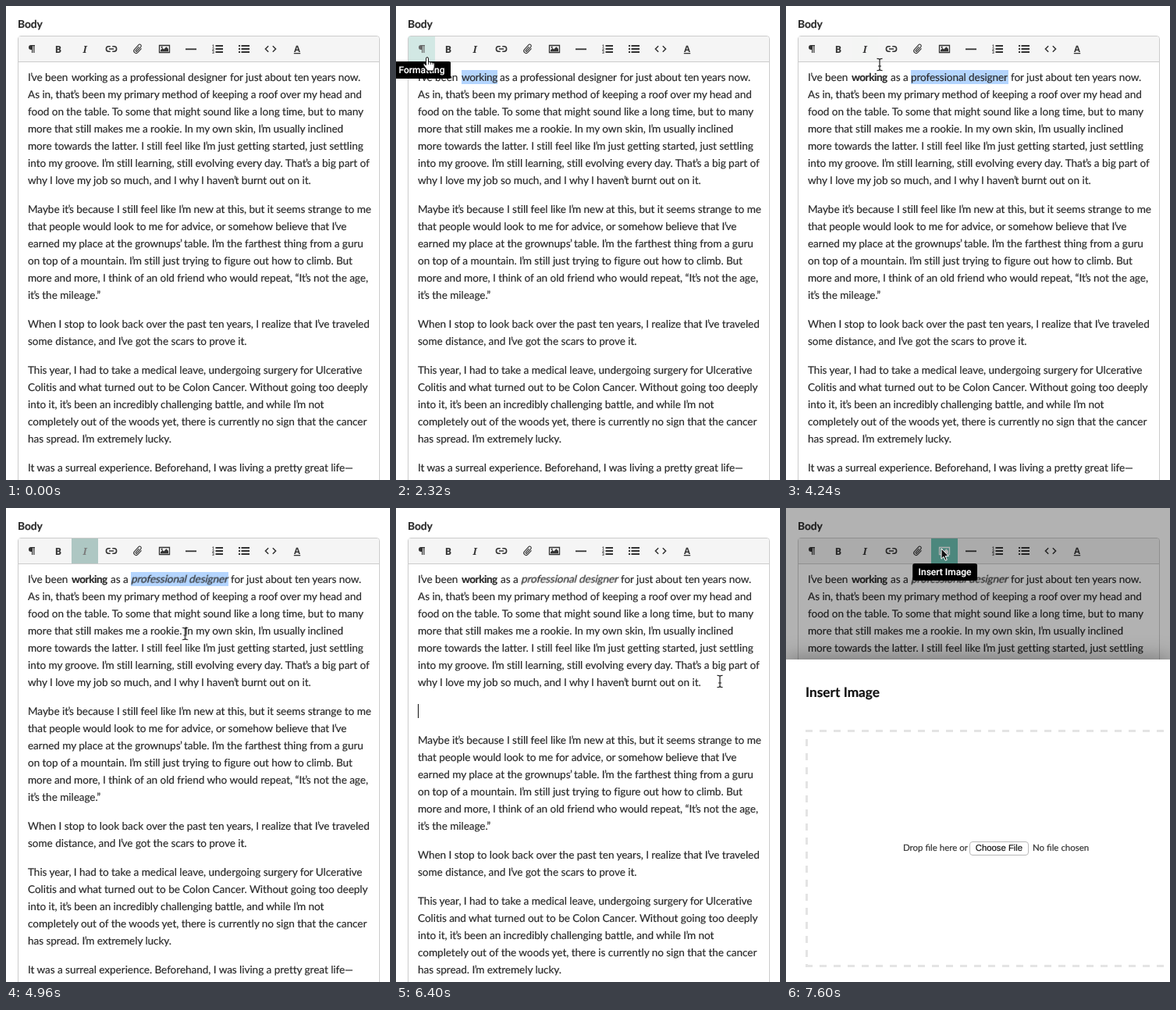
Animation, 492 px wide and 607 px high, one loop 8 s. Source, as an HTML page:

```html
<!DOCTYPE html>
<html lang="en">
<head>
<meta charset="utf-8">
<title>Text editor</title>
<style>
/* The loop is 8 s, so 1% of every keyframe rule is one 80 ms tick. */
html, body { margin: 0; width: 100%; height: 100%; overflow: hidden; background: #fff; }
#stage {
  position: relative; width: 492px; height: 607px; overflow: hidden; background: #fff;
  font: 13.6px/22px Lato, sans-serif; letter-spacing: -.06px; color: #2a2a2a;
  text-rendering: geometricPrecision; white-space: nowrap;
  -webkit-text-stroke: .18px;
}
#stage div, #stage span, #cursor { position: absolute; }
#stage i { font-style: normal; margin-left: -.5px; letter-spacing: -1.4px; }
#label { left: 15px; top: 12px; font-weight: 700; font-size: 13.8px; }
#frame {
  left: 15px; top: 38px; width: 462px; height: 600px;
  border: 1px solid #ccc; border-radius: 4px 4px 0 0;
}
#bar {
  --off: #f5f5f5; --hot: #6cc1b3; --on: #c9c9c9;
  left: 0; top: 0; width: 462px; height: 32px; display: flex;
  background: var(--off); border-bottom: 1px solid #ccc; border-radius: 3px 3px 0 0;
}
#bar svg {
  width: 34px; height: 32px; color: #333; fill: currentColor; -webkit-text-stroke: 0;
  font: 700 12.5px "Noto Sans", sans-serif; text-anchor: middle;
}
#bar .line { fill: none; stroke: currentColor; stroke-width: 1.6; }
#line1 span { top: 80px; }
#rest { left: 28px; top: 102px; }
#rest p { margin: 0 0 15px; }
#later { top: 147px; left: 0; }
.sel { top: 82px; height: 18px; background: #b4d5fe; }
.caret { width: 1px; background: #111; }
.tip {
  top: 71px; height: 22px; padding: 0 8px; border-radius: 3px; translate: -50%;
  background: #000; color: #fff; font: 500 12px/22px Roboto, sans-serif; letter-spacing: 0;
}
#shade { inset: 0; background: rgba(0, 0, 0, .3); }
#modal {
  left: 0; top: 194px; width: 492px; height: 413px; background: #fff;
  box-shadow: 0 0 26px rgba(0, 0, 0, .4); font-size: 11.5px; letter-spacing: 0; color: #333;
}
#modal b { position: absolute; left: 25px; top: 31px; font-size: 17.3px; color: #111; }
.dash { --d: #e4e4e4 0 9px, transparent 9px 18px; left: 25px; }
.dash.h { width: 467px; height: 3px; background: repeating-linear-gradient(90deg, var(--d)); }
.dash.v { top: 102px; width: 3px; height: 292px; background: repeating-linear-gradient(var(--d)); }
#pick {
  left: 235px; top: 233px; width: 74px; height: 16px; border: 1px solid #b8b8b8; border-radius: 4px;
  font: 11.3px/16px "Liberation Sans", sans-serif; text-align: center; color: #111;
}
#cursor { left: 0; top: 0; overflow: visible; width: 1px; height: 1px; }

/* Hard switches */
#work, #ital, #tail, #as, #later, .sel, .caret, .tip, #shade, #modal, #cursor, .shape {
  animation: 8s step-end infinite;
}
#work { left: 84px; letter-spacing: -.3px; animation-name: bold; }
#ital { left: 159px; letter-spacing: -.1px; transform-origin: 0 16px; animation-name: italic; }
#as { left: 133px; animation-name: nudge; }
#tail { left: 287px; letter-spacing: -.1px; animation-name: nudge; }
#later { animation-name: enter; }
#selA { left: 84px; width: 46px; animation-name: selA; }
#selB { left: 160px; width: 125px; animation-name: selB; }
#caretA { left: 390px; top: 210px; height: 22px; animation-name: caretA; }
#caretB { left: 28px; top: 251px; height: 18px; animation-name: caretB; }
#tipF { left: 33px; animation-name: tipF; }
#tipB { left: 67px; animation-name: tipB; }
#tipI { left: 101px; animation-name: tipI; }
#tipP { left: 203.5px; animation-name: tipP; }
#shade, #modal { animation-name: modal; }
#cursor { animation-name: path; }
#beam { animation-name: beam; }
#hand { animation-name: hand; }
#arrow { animation-name: modal; }

@keyframes bold { 0% { font-weight: 400 } 34%, 100% { font-weight: 700; letter-spacing: -.5px } }
@keyframes italic { 0% { translate: 0 } 34% { translate: 1px } 60%, 100% { translate: 1px; transform: skewX(-13deg) } }
@keyframes nudge { 0% { translate: 0 } 34%, 100% { translate: 1px } }
@keyframes enter { 0% { translate: 0 } 80%, 100% { translate: 0 37px } }
@keyframes selA { 0%, 45%, 100% { opacity: 0 } 26% { opacity: 1; width: 46px } 34% { opacity: 1; width: 47px } }
@keyframes selB { 0%, 72%, 100% { opacity: 0 } 45% { opacity: 1; width: 73px } 46% { opacity: 1; width: 125px } }
@keyframes caretA { 0%, 78%, 100% { opacity: 0 } 72% { opacity: 1 } }
@keyframes caretB { 0%, 87% { opacity: 0 } 80%, 92%, 100% { opacity: 1 } }
@keyframes tipF { 0%, 13%, 31%, 100% { opacity: 0 } 11%, 29% { opacity: 1 } }
@keyframes tipB { 0%, 17%, 38%, 100% { opacity: 0 } 13%, 31% { opacity: 1 } }
@keyframes tipI { 0%, 61%, 100% { opacity: 0 } 54% { opacity: 1 } }
@keyframes tipP { 0% { opacity: 0 } 88%, 100% { opacity: 1 } }
@keyframes modal { 0% { opacity: 0 } 95%, 100% { opacity: 1 } }
@keyframes hand { 0%, 17%, 38%, 61%, 95%, 100% { opacity: 0 } 11%, 29%, 54%, 88% { opacity: 1 } }
@keyframes beam { 0%, 11%, 29%, 54%, 88%, 100% { opacity: 0 } 1%, 17%, 38%, 61% { opacity: 1 } }

/* Pointer: up to the bar, both words, end of paragraph, image button */
@keyframes path {
  0%, 1% { translate: 314px 574px }
  2% { translate: 240px 455px }
  3% { translate: 175px 345px }
  4% { translate: 157px 321px }
  7% { translate: 150px 302px }
  8% { translate: 122px 220px }
  9% { translate: 80px 120px }
  10% { translate: 50px 80px }
  11% { translate: 38px 62px }
  13% { translate: 53px 60px }
  14% { translate: 62px 60px }
  15% { translate: 67px 58px }
  17% { translate: 92px 80px }
  18% { translate: 112px 87px }
  20% { translate: 105px 88px }
  22% { translate: 103px 90px }
  24% { translate: 102px 91px }
  27% { translate: 92px 86px }
  28% { translate: 62px 75px }
  29% { translate: 40px 66px }
  30% { translate: 43px 62px }
  31% { translate: 57px 60px }
  32% { translate: 64px 58px }
  37% { translate: 73px 60px }
  38% { translate: 104px 76px }
  39% { translate: 145px 81px }
  40% { translate: 180px 83px }
  41% { translate: 195px 83px }
  43% { translate: 186px 91px }
  46% { translate: 218px 91px }
  47% { translate: 243px 89px }
  50% { translate: 232px 87px }
  51% { translate: 205px 83px }
  52% { translate: 162px 79px }
  53% { translate: 120px 75px }
  54% { translate: 104px 62px }
  56% { translate: 99px 58px }
  61% { translate: 142px 92px }
  62% { translate: 229.5px 161px }
  63% { translate: 345px 222px }
  64% { translate: 409px 251px }
  66% { translate: 410px 260px }
  69% { translate: 412px 244px }
  71% { translate: 413px 226px }
  73% { translate: 415px 222px }
  83% { translate: 412px 214px }
  84% { translate: 394px 190px }
  85% { translate: 340px 142px }
  86% { translate: 275px 100px }
  87% { translate: 228px 79px }
  88% { translate: 207px 60px }
  90%, 100% { translate: 199px 52px }
}

/* Button fades */
#bF { animation: fadeF 8s linear infinite; }
#bB { animation: fadeB 8s linear infinite; }
#bI { animation: fadeI 8s linear infinite; }
#bP { animation: fadeP 8s linear infinite; }
@keyframes fadeF {
  0%, 9.8%, 14.6%, 28.6%, 32.4%, 100% { background: var(--off); color: #333 }
  11%, 13%, 30.2%, 30.8% { background: var(--hot); color: #fff }
}
@keyframes fadeB {
  0%, 12.5%, 20%, 30.8%, 47%, 100% { background: var(--off); color: #333 }
  14%, 17%, 32%, 37.6% { background: var(--hot); color: #fff }
  40%, 45% { background: var(--on); color: #444 }
}
@keyframes fadeI {
  0%, 53%, 75%, 100% { background: var(--off); color: #333 }
  54.5%, 60.6% { background: var(--hot); color: #fff }
  62.6%, 72% { background: var(--on); color: #444 }
}
@keyframes fadeP {
  0%, 87.4% { background: var(--off); color: #333 }
  89%, 100% { background: var(--hot); color: #fff }
}
</style>
</head>
<body>
<div id="stage">
  <div id="label">Body</div>
  <div id="frame">
    <div id="bar">
      <svg id="bF" viewBox="-17 -16 34 32"><path d="M4-5H-1a3 3 0 0 0 0 6H0V5H1.2V-3.8H2.3V5H3.5V-3.8H4z"/></svg>
      <svg id="bB" viewBox="-17 -16 34 32"><text y="4.5">B</text></svg>
      <svg id="bI" viewBox="-17 -16 34 32"><text y="4.5" font-style="italic" font-family="Noto Serif, serif">I</text></svg>
      <svg viewBox="-17 -16 34 32"><path class="line" d="M-1.3-3.2H-3.4a3.2 3.2 0 0 0 0 6.4H-1.3M1.3-3.2H3.4a3.2 3.2 0 0 1 0 6.4H1.3M-3 0H3"/></svg>
      <svg viewBox="-17 -16 34 32"><path class="line" style="stroke-width:1.1" transform="rotate(42)" d="M2.9-3.5V3.4a2.9 2.9 0 0 1-5.8 0V-4.4a2 2 0 0 1 4 0V3a.9.9 0 0 1-1.9 0V-3"/></svg>
      <svg id="bP" viewBox="-17 -16 34 32"><path class="line" style="stroke-width:1.3" d="M-6.5-4.5h13v9h-13z"/><path d="M-5 3.2V1.5l2.5-2.7L-.8.5 2.4-2.7 5 0v3.2z"/><circle cx="-3.3" cy="-2.2" r="1.1"/></svg>
      <svg viewBox="-17 -16 34 32"><path d="M-7-.6H7V1.2H-7z"/></svg>
      <svg viewBox="-17 -16 34 32"><path d="M-2.5-5H7v2h-9.5zM-2.5-1H7v2h-9.5zM-2.5 3H7v2h-9.5z"/><g font-size="5"><text x="-5.6" y="-2">1</text><text x="-5.6" y="2">2</text><text x="-5.6" y="6">3</text></g></svg>
      <svg viewBox="-17 -16 34 32"><path d="M-3.5-5H7v2H-3.5zM-3.5-1H7v2H-3.5zM-3.5 3H7v2H-3.5zM-7-5h2v2h-2zM-7-1h2v2h-2zM-7 3h2v2h-2z"/></svg>
      <svg viewBox="-17 -16 34 32"><path class="line" style="stroke-width:1.5" d="M-2.8-3.8-6.6 0-2.8 3.8M2.8-3.8 6.6 0 2.8 3.8"/></svg>
      <svg viewBox="-17 -16 34 32"><text y="3.6" font-size="11.5">A</text><path d="M-4.2 5h8.4v1.3h-8.4z"/></svg>
    </div>
  </div>

  <div class="sel" id="selA"></div>
  <div class="sel" id="selB"></div>
  <div id="line1">
    <span style="left:28px">I’ve been</span>
    <span id="work">working</span>
    <span id="as">as a</span>
    <span id="ital">professional designer</span>
    <span id="tail">for just about ten years now.</span>
  </div>
  <div id="rest">
    <p>As in, that’s been my primary method of keeping a roof over my head and<br>
    food on the table. To some that might sound like a long time, but to many<br>
    more that still makes me a rookie. In my own skin, I’m usually inclined<br>
    more towards the latter. I still feel like I’m just getting started, just settling<br>
    into my groove. I’m still learning, still evolving every day. That’s a big part of<br>
    why I love my job so much, and I why I haven’t burnt out on it.</p>
    <div id="later">
      <p>Maybe it’s because I still feel like I’m new at this, but it seems strange to me<br>
      that people would look to me for advice, or somehow believe that I’ve<br>
      earned my place at the grownups’ table. I’m the farthest thing from a guru<br>
      on top of a mountain. I’m still just trying to figure out how to climb. But<br>
      more and more, I think of an old friend who would repeat, “It’s not the age,<br>
      it’s the mileage.”</p>
      <p>When I stop to look back over the past ten years, I realize that I’ve traveled<br>
      some distance, and I’ve got the scars to prove it.</p>
      <p>This year, I had to take a medical leave, undergoing surgery for Ulcerative<br>
      Colitis and what turned out to be Colon Cancer. Without going too deeply<br>
      into it, it’s been an incredibly challenging battle, and while I’m not<br>
      completely out of the woods yet, there is currently no sign that the cancer<br>
      has spread. I’m extremely lucky.</p>
      <p>It was a surreal experience. Beforehand, I was living a pretty great life—</p>
    </div>
  </div>
  <div class="caret" id="caretA"></div>
  <div class="caret" id="caretB"></div>

  <div id="shade"></div>
  <div id="modal">
    <b>Insert Image</b>
    <div class="dash h" style="top:90px"></div>
    <div class="dash v"></div>
    <div class="dash h" style="top:391px"></div>
    <span style="left:150px;top:231px">Drop file here or</span>
    <div id="pick">Choose File</div>
    <span style="left:316px;top:231px">No file chosen</span>
  </div>

  <div class="tip" id="tipF">Formatting</div>
  <div class="tip" id="tipB">Bold</div>
  <div class="tip" id="tipI">Italic</div>
  <div class="tip" id="tipP">Insert Image</div>

  <svg id="cursor">
    <g class="shape" id="beam" fill="none" stroke="#222" stroke-width="1.2">
      <path d="M-3.5-7.6C-1.5-7.6 0-7.2 0-6 0-7.2 1.5-7.6 3.5-7.6M0-6V6M-3.5 7.6C-1.5 7.6 0 7.2 0 6 0 7.2 1.5 7.6 3.5 7.6M-2 2H2"/>
    </g>
    <g class="shape" id="hand" fill="#fff" stroke="#111" stroke-linejoin="round">
      <path d="M-1.5 1.2a1.5 1.5 0 0 1 3 0V6.5c.3-1.4 2.6-1.4 2.8.1.4-1 2.5-.9 2.7.5.5-.8 2.2-.5 2.2 1V12c0 1.5-1 2.5-1.3 5H0C-.5 15-3.5 12-4.8 9.5c-.7-1.6 1.2-2.2 2-1.1L-1.5 10z"/>
      <path d="M1.5 6.5V9M4.3 6.6V9M7 7.1V9" fill="none" stroke-width=".8"/>
    </g>
    <g class="shape" id="arrow" fill="#111" stroke="#fff">
      <path d="M0 0V13.2l3-2.8 2.1 4.8 2.2-.9-2.1-4.7h4.1z"/>
    </g>
  </svg>
</div>
<script>
// Set apostrophes tight against their neighbours.
for (const el of document.querySelectorAll("#line1 span, #rest p"))
  el.innerHTML = el.innerHTML.replaceAll("’", "<i>’</i>");
</script>
</body>
</html>
```
